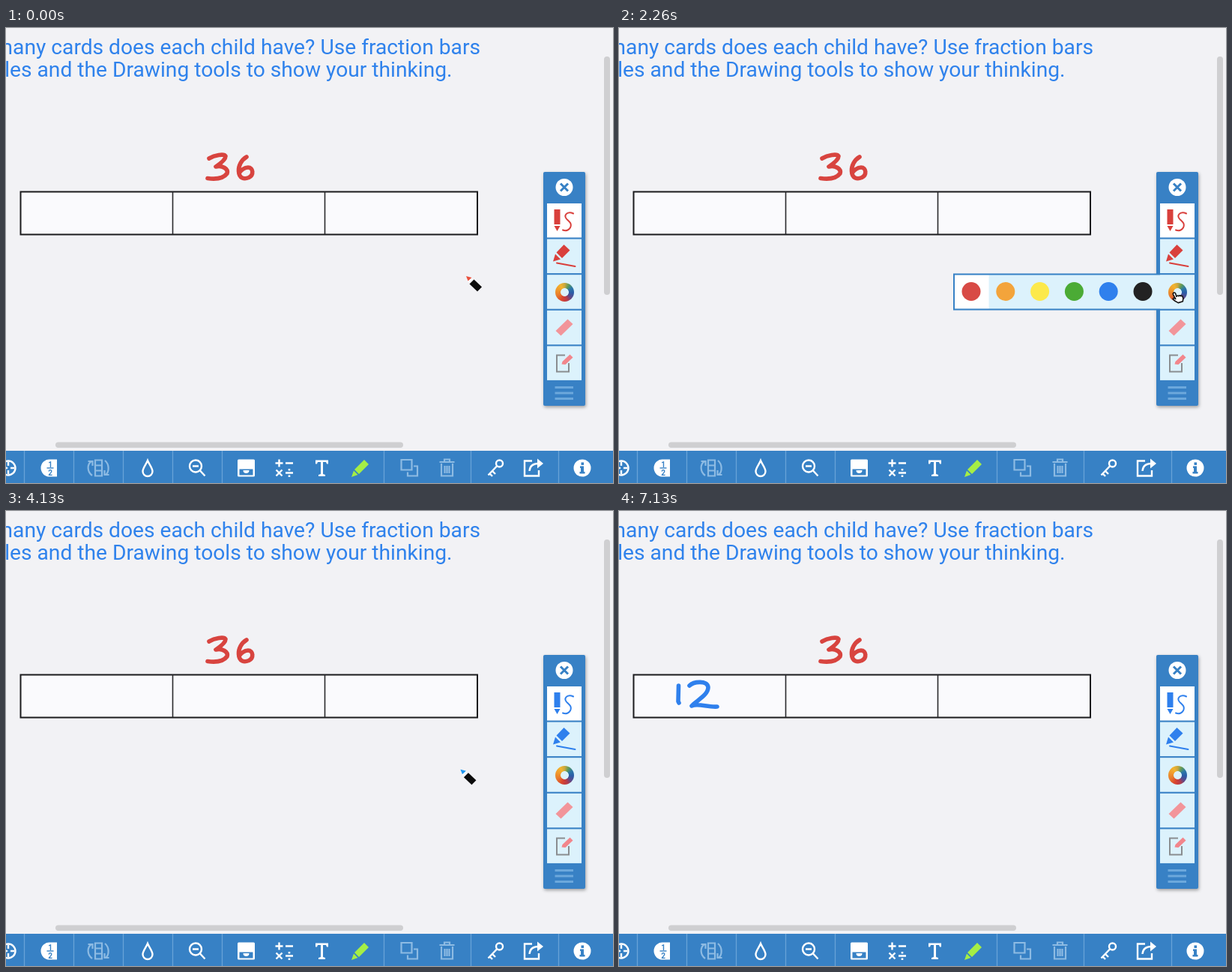
Animation of 810x607 px, one loop 8.13 s. Source, as an HTML page:

```html
<!DOCTYPE html>
<html lang="en">
<head>
<meta charset="utf-8">
<title>Fraction bars</title>
<style>
  html, body { margin: 0; width: 100%; height: 100%; overflow: hidden; background: #f2f2f5; }
  svg { display: block; width: 810px; height: 607px; --pen: #d9403c; }
  .prompt { font: 400 28.2px Roboto, sans-serif; fill: #2f82ec; text-anchor: end; }
  .num { font: 700 10px Roboto, sans-serif; fill: #3781c5; text-anchor: middle; }
  .line { fill: none; stroke: #fff; stroke-width: 2.4; }
  .dim { fill: none; stroke: #8dbbe3; stroke-width: 2.2; }
  .ink { fill: none; stroke-width: 5.6; stroke-linecap: round; stroke-linejoin: round; }
  .pen { fill: var(--pen); }
  .penline { fill: none; stroke: var(--pen); stroke-width: 2; stroke-linecap: round; }
  .wheel {
    width: 25px; height: 25px; border-radius: 50%;
    background: radial-gradient(circle, #dcf2fc 5px, transparent 5.8px),
      conic-gradient(#c9a840, #5d9a5a 30deg, #2b77a8 60deg, #2b5ca8 95deg, #5a4a8c 130deg,
        #b53a4a 160deg, #d9432f 200deg, #e77b2d 245deg, #f09a2d 290deg, #f3b52e 330deg, #c9a840);
  }
</style>
</head>
<body>
<svg viewBox="0 0 810 607" xmlns="http://www.w3.org/2000/svg">
  <defs>
    <filter id="shadow" x="-30%" y="-30%" width="160%" height="160%">
      <feDropShadow dx="1" dy="2" stdDeviation="2" flood-opacity=".35"/>
    </filter>
  </defs>
  <rect width="810" height="607" fill="#f2f2f5"/>

  <text class="prompt" x="633" y="35">How many cards does each child have? Use fraction bars</text>
  <text class="prompt" x="595.5" y="65">tables and the Drawing tools to show your thinking.</text>

  <rect x="19.500" y="218.500" width="609.500" height="57" fill="#fafafd" stroke="#1b1b1d" stroke-width="2"/>
  <path d="M222.500 218.500V275M425.500 218.500V275" stroke="#2a2a2c" stroke-width="1.600"/>
  <g class="ink" stroke="#d8443f">
    <path d="M271 174C278 170 291 167 293 171C293 176 286 181 280 185C289 183 297 188 295 194C290 201 280 202 269 200.500"/>
    <path d="M321 172C314 176 310 184 310.500 191C311 201 318 202 324 199.500C331 196 330 186 323 186C318 186 313 190 311 194"/>
  </g>
  <path id="one" class="ink" stroke="#2f80ed" d="M79.500 233L79 254L80 256"/>
  <path id="two" class="ink" stroke="#2f80ed" d="M94 233C100 227 118 226 119 235C119 246 103 253 97 260C105 256 118 262 131 261"/>

  <rect x="798" y="38" width="8" height="318" rx="4" fill="#cfcfd1"/>
  <rect x="66" y="552.500" width="464" height="7.500" rx="3.700" fill="#cfcfd1"/>

  <rect y="564" width="810" height="43" fill="#3781c5"/>
  <path id="splits" stroke="#68a3d8" stroke-width="1.300"/>

  <g id="bottom-icons">
    <circle class="line" cx="3" cy="587" r="9.500"/>
    <path class="line" d="M3 579V584M3 590V595M0 587H2M6 587H11"/>
    <path d="M68 575.500V598.500H58A11.500 11.500 0 0 1 58 575.500Z" fill="#fff"/>
    <text class="num" x="59" y="585.500">1</text>
    <path d="M54.500 587H63.500" stroke="#3781c5" stroke-width="1.400"/>
    <text class="num" x="59" y="597">2</text>
    <path class="dim" d="M119 576.500H128V597.500H119ZM119 583.500H128M119 590.500H128"/>
    <path class="dim" d="M115 597C108 592 108 582 114 578M109.500 578H115.500V584M132 577C138 582 138 592 133 596M137.500 596H131.500V590"/>
    <path class="line" d="M189 577C187 582 182.500 587 182.500 591.500A6.500 6.500 0 0 0 195.500 591.500C195.500 587 191 582 189 577Z"/>
    <circle class="line" cx="253" cy="584.500" r="8"/>
    <path class="line" d="M249 584.500H257M259 590.500L265.500 597.500"/>
    <rect x="309" y="575.500" width="23" height="23" rx="1.500" fill="#fff"/>
    <path d="M311.500 588.500H329.500V596.500H311.500Z" fill="#3781c5"/>
    <path d="M316.500 590H324.500A4 4 0 0 1 316.500 590Z" fill="#fff"/>
    <path class="line" d="M359.500 580.500H369.500M364.500 575.500V585.500M373 580.500H383M360.500 589.500L368.500 597.500M368.500 589.500L360.500 597.500M373 593.500H383"/>
    <path d="M376.700 588h2.600v2.600h-2.600zM376.700 596.400h2.600v2.600h-2.600z" fill="#fff"/>
    <path d="M413 576.500h17v5h-2l-1-2.500h-4v16l3 1v2h-9v-2l3-1v-16h-4l-1 2.500h-2z" fill="#fff"/>
    <path d="M478 576L484 582L471 595L465 589ZM464 590.500L469.500 596L461 599Z" fill="#a5ee45"/>
    <path class="dim" d="M527.500 576H541.500V589.500H527.500ZM544 584.500H549V597.500H536V592.500"/>
    <path class="dim" d="M578.500 579H598.500M585 578V575.500H592V578M581 581V597.500H596V581M585.500 584V594M588.500 584V594M591.500 584V594"/>
    <circle class="line" cx="658.500" cy="581" r="4.500"/>
    <path class="line" d="M655 584.500L643.500 596.500M649 591L653 595M645.500 594.500L649 598"/>
    <path class="line" d="M702 577.500H692V597.500H711V590M698.500 591C699 584 703 581 711 581"/>
    <path d="M709 574.500L717 581L709 587.500Z" fill="#fff"/>
    <circle cx="769" cy="587" r="11.500" fill="#fff"/>
    <path d="M767.500 579.500h3.600v3.400h-3.600zM766 584.500h5v7.500h1.500v2.500h-7v-2.500h1.500v-5h-1z" fill="#3781c5"/>
  </g>

  <rect x="717" y="192" width="56" height="312" rx="2" fill="#3781c5" filter="url(#shadow)"/>
  <circle cx="745" cy="212.500" r="11.500" fill="#fff"/>
  <path d="M740 207.500L750 217.500M750 207.500L740 217.500" stroke="#3781c5" stroke-width="3"/>
  <g id="cells"></g>
  <path d="M732.500 479.500H757M732.500 487H757M732.500 494.500H757" stroke="#6ca8dc" stroke-width="2.800"/>

  <path class="pen" d="M731.500 242H739.500V262H731.500ZM731.500 264H739.500L735.500 271Z"/>
  <path class="penline" d="M757 247.500C750 244 744 249 747.500 254C750.500 258 755 259 753.500 265C752 270 747 271 743 269.500"/>
  <path class="pen" d="M744.500 289L752.500 296.500L742 307L734.500 299.500ZM733 301.500L740 308.500L730 311.500Z"/>
  <path class="penline" d="M735 313.500L759.500 318"/>
  <foreignObject x="732.500" y="339.500" width="25" height="25"><div xmlns="http://www.w3.org/1999/xhtml" class="wheel"></div></foreignObject>
  <path d="M749.500 388.500L756.500 395L740.500 410.500L733.500 404Z" fill="#f2959a"/>
  <path d="M746 436.500H735V458.500H751V447" fill="none" stroke="#8a8d90" stroke-width="2"/>
  <path d="M752.500 435.500L756.500 439.500L746.500 449L741.500 448.500L742.500 445Z" fill="#f2868c"/>

  <g id="palette">
    <path d="M722 328.500H447V375.500H722Z" fill="#dcf2fc"/>
    <rect id="chosen" y="329.500" width="45.500" height="45" fill="#fff"/>
    <path d="M722 328.500H447V375.500H722" fill="none" stroke="#3781c5" stroke-width="2"/>
  </g>
  <circle id="press" cx="653.500" cy="356" r="24" fill="#fff" filter="url(#shadow)"/>
  <g id="cursor">
    <g id="pencil">
      <path d="M0 0L9 3L3 9Z" fill="#fff"/>
      <path id="tip" d="M0 0L7.500 2L2.500 6.500Z"/>
      <path d="M4.500 10.500L10.500 4.500L21 14.500L15 20.500Z" fill="#0c0c0c"/>
    </g>
    <path id="hand" transform="rotate(-18) scale(.86)" d="M-2.500 2a2 2 0 0 1 4 0V7q2.500-2 3.500.300q2.500-1 3 1q2.500-.500 2.500 2v2.500L8.500 17H1L-3 12.500L-5 9q1-2 3-.300L-1 10Z"
      fill="#fff" stroke="#151515" stroke-width="1.900" stroke-linejoin="round"/>
  </g>
</svg>
<script>
const LOOP = 8130, STEP = 200 / 3;
const $ = id => document.getElementById(id);

function add(parent, tag, attrs) {
  const el = document.createElementNS('http://www.w3.org/2000/svg', tag);
  for (const k in attrs) el.setAttribute(k, attrs[k]);
  parent.appendChild(el);
}

$('splits').setAttribute('d', [24.5, 90.5, 156.5, 222.5, 288.5, 504.5, 620.5, 737.5]
  .map(x => `M${x} 564V607`).join(''));
for (let i = 0; i < 5; i++) {
  add($('cells'), 'rect', { x: 722, y: 234 + i * 47.6, width: 46, height: 45.5, fill: i ? '#dcf2fc' : '#fff' });
}
['#d84a45', '#f3a43b', '#fce94b', '#4bab35', '#2f80ed', '#222'].forEach((fill, i) =>
  add($('palette'), 'circle', { cx: 470 + i * 45.8, cy: 351.5, r: 12.5, fill }));

// Pointer route: time, x, y
const route = [
  [733, 614, 331], [867, 640, 337], [1000, 690, 348], [1133, 722, 354], [1267, 745, 358],
  [1400, 744, 354], [2200, 744, 354], [2267, 741, 353], [2467, 705, 355], [2733, 654, 355],
  [4067, 654, 355], [4200, 560, 335], [4333, 330, 285], [4533, 138, 252], [4733, 102, 241],
  [4933, 95, 238], [5133, 79, 233], [5867, 79, 233], [5933, 94, 233]
];

function pointer(t) {
  const i = route.findIndex(p => p[0] >= t);
  if (i < 1) return (i ? route.at(-1) : route[0]).slice(1);
  const a = route[i - 1], b = route[i], k = (t - a[0]) / (b[0] - a[0]);
  return [a[1] + (b[1] - a[1]) * k, a[2] + (b[2] - a[2]) * k];
}

const progress = (t, from, to) => Math.min(1, Math.max(0, (t - from) / (to - from)));
const show = (el, on) => el.setAttribute('visibility', on ? 'visible' : 'hidden');

// Reveals part of a stroke and returns its current end
function trace(path, k) {
  const len = path.getTotalLength();
  path.style.strokeDasharray = `${len * k} ${len + 20}`;
  show(path, k > 0);
  const p = path.getPointAtLength(len * k);
  return [p.x, p.y];
}

function render(now) {
  const t = Math.floor((now + 8) / STEP) * STEP + 1;
  const blue = t > 3000;

  const endOne = trace($('one'), progress(t, 5468, 5868));
  const endTwo = trace($('two'), progress(t, 6068, 6600));
  let pos = pointer(t);
  if (t > 5468 && t < 5870) pos = endOne;
  if (t > 6068) pos = endTwo;

  const pointing = t > 1133 && t < 4133;
  $('cursor').setAttribute('transform', `translate(${pos})`);
  $('cursor').setAttribute('opacity', t > 3000 && t < 3200 ? 0.75 : 1);
  show($('cursor'), t < 7133);
  $('pencil').style.display = pointing ? 'none' : '';
  $('hand').style.display = pointing ? '' : 'none';
  $('tip').setAttribute('fill', blue ? '#1f96f0' : '#e8503c');
  document.querySelector('svg').style.setProperty('--pen', blue ? '#2f80ed' : '#d9403c');

  const away = t < 2000 ? 1 - progress(t, 1600, 1733) : progress(t, 3000, 3150);
  show($('palette'), t > 1660 && t < 3200);
  $('palette').setAttribute('transform', `translate(${away * 45} 0)`);
  $('palette').setAttribute('opacity', 1 - 0.94 * away);
  $('chosen').setAttribute('x', 448 + (blue ? 4 * 45.8 : 0));

  show($('press'), t > 3000 && t < 3466);
  $('press').setAttribute('opacity', t < 3200 ? 0.75 : t < 3400 ? 0.35 : 0.15);
}

function tick(now) {
  render(now % LOOP);
  requestAnimationFrame(tick);
}
render(0);
requestAnimationFrame(tick);
</script>
</body>
</html>
```
